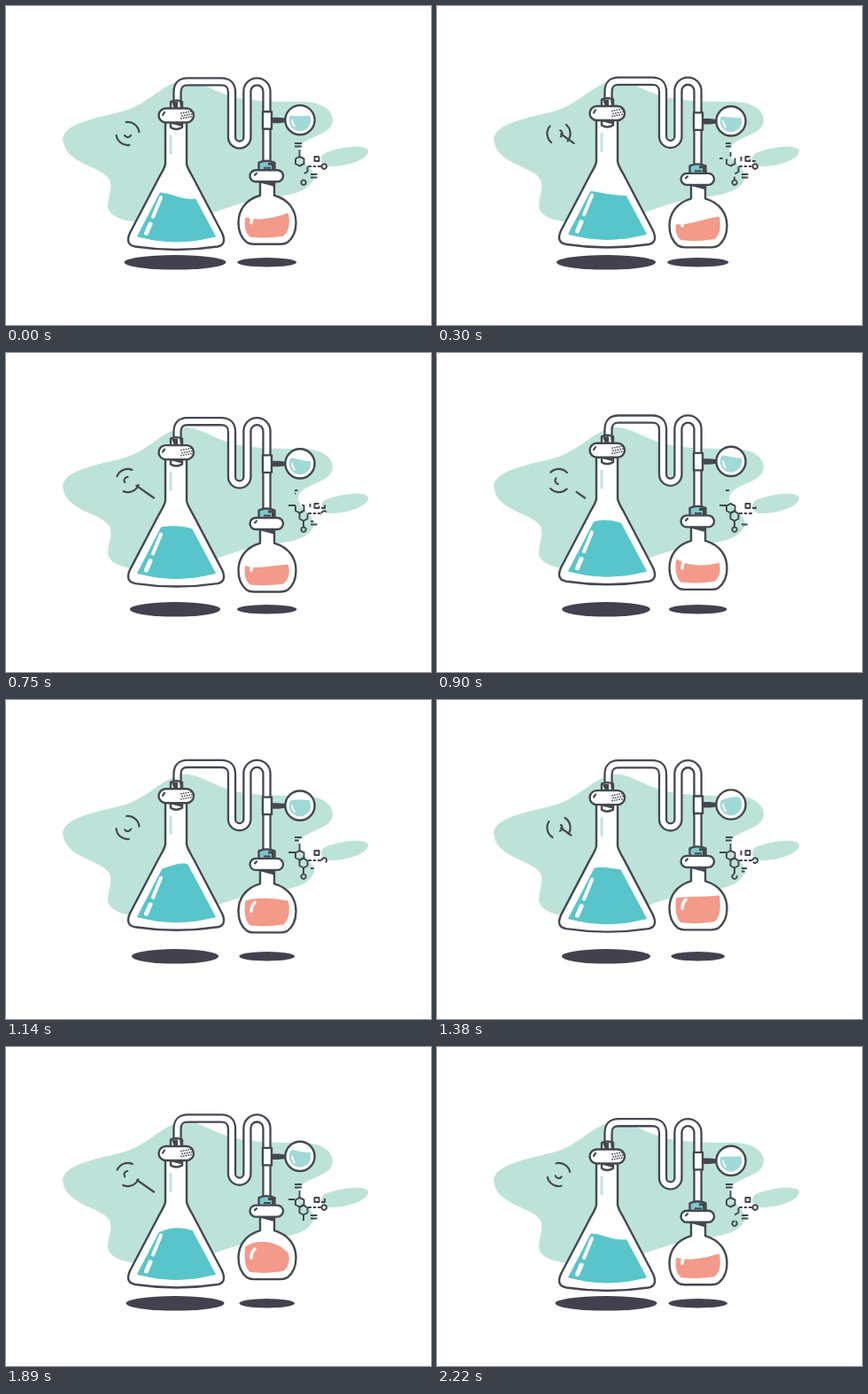
Animation, 480 px wide and 360 px high, one loop 2.25 s. Source, as an HTML page:

```html
<!DOCTYPE html>
<html lang="en">
<head>
<meta charset="utf-8">
<title>Chemistry set</title>
<style>
html, body { margin: 0; height: 100%; overflow: hidden; background: #fff; }
svg { display: block; }
.line { fill: none; stroke: #444850; stroke-width: 2.2; stroke-linecap: round; stroke-linejoin: round; }
.glass { fill: #fff; stroke: #444850; stroke-width: 2.4; stroke-linejoin: round; }
.ink { fill: #444850; }
.shine { fill: none; stroke: #fff; stroke-linecap: round; }
#molecule path { stroke-width: 2; stroke-linecap: butt; }
</style>
</head>
<body>
<svg width="480" height="360" viewBox="0 0 480 360">
  <defs>
    <clipPath id="round"><circle r="12.3"/></clipPath>
    <path id="tube" d="M193.500 110V97Q193.500 85 205 85H243Q255 85 255 97V147.500A8.700 8.700 0 0 0 272.400 147.500V96A11 11 0 0 1 294.500 96V190"/>
  </defs>
  <g fill="#bde3d9">
    <path d="M64 150C66 134 94 128 127 120C160 113 172 90 199 84C216 81 234 98 264 104C286 108 309 108 334 108C356 108 369 117 369 129C368 148 334 146 330 163C329 175 344 179 347 189C349 194 348 196 345 199C338 214 302 215 277 220C242 228 212 245 170 245C137 245 116 239 115 226C115 214 121 206 117 196C108 180 66 179 64 150Z"/>
    <path d="M360 166C379 158 407 156 409 163C410 174 381 182 364 181C356 180 353 171 360 166Z"/>
  </g>
  <g fill="#43414e">
    <ellipse id="shadowA" cx="191" cy="289.300" ry="8.300"/>
    <ellipse id="shadowB" cx="294.700" cy="289.300" ry="5.200"/>
  </g>

  <g id="pipe" fill="none">
    <use href="#tube" stroke="#444850" stroke-width="10.400"/>
    <use href="#tube" stroke="#fff" stroke-width="5.800"/>
  </g>

  <g id="flaskA">
    <path class="glass" d="M180 130V178C179 184 175 189 172 195L140 256C136 265 138 270 146 271.500C176 276 209 276 239 271.500C246 270 248 265 244 256L212 195C209 189 205 184 204 178V130Z"/>
    <path id="liquidA" fill="#58c5ca" stroke="#58c5ca" stroke-linejoin="round"/>
    <path class="shine" stroke-width="4" d="M175 216L166 238"/>
    <path class="shine" stroke-width="5" d="M163 246L158.500 256.500"/>
    <path stroke="#bde3d9" stroke-width="2.800" stroke-linecap="round" d="M186 147V166"/>
    <path class="glass" d="M186 130V137Q192 141 199 137V130Z"/>
    <path class="ink" d="M187 131H199V136L187 133Z"/>
    <path class="glass" d="M186 116V108Q192 105 199 108V116Z"/>
    <path class="ink" d="M187 108H194V116H190ZM196 108H199V116H197Z"/>
    <rect class="glass" x="172.500" y="115.500" width="39.500" height="16" rx="8"/>
    <path class="line" stroke-width="3" d="M177 123L179 120"/>
    <g id="dots" class="ink"></g>
  </g>

  <g id="flaskB">
    <path class="glass" d="M287 196V214C270 219 262.500 231 262.500 245C262.500 256 267 263 272 267Q275 269 280 269H310Q315 269 318 267C323 263 327.500 256 327.500 245C327.500 231 320 219 303 214V196Z"/>
    <path id="liquidB" fill="#f39a8a" stroke="#f39a8a" stroke-width="2" stroke-linejoin="round"/>
    <path class="shine" stroke-width="3.500" d="M281 235Q277 239 277 245"/>
    <path class="ink" d="M288 198H303V204L288 200Z"/>
    <path class="glass" style="fill:#7fc6c8" d="M285.500 187V177Q294 173 303.500 177V187Z"/>
    <path class="ink" d="M296 177H303V187H300V180H296ZM291 182H299V184H291Z"/>
    <rect class="glass" x="275.500" y="185.500" width="37.500" height="13" rx="6.500"/>
    <path class="line" stroke-width="3" d="M281 191L283 189"/>
  </g>

  <g id="bulb">
    <path class="ink" d="M300 126H308L316 127V131.500L308 132.500H300Z"/>
    <rect class="glass" x="290" y="119.500" width="10" height="19.500"/>
    <g transform="translate(332 129)">
      <circle class="glass" r="16.600"/>
      <g clip-path="url(#round)"><path id="liquidC" fill="#a1d9d8"/></g>
      <path class="shine" stroke-width="1.800" d="M-9 0Q-8 5 -6 7"/>
    </g>
  </g>

  <g transform="translate(137.500 144)">
    <path id="orbit" class="line" d="M-1 -13A13 13 0 0 1 13 -1M1 13A13 13 0 0 1 -13 1"/>
    <path id="core" class="line" d="M3.500 2A4 4 0 0 1 -3.500 2"/>
  </g>
  <path id="handle" class="line"/>
  <g id="molecule"></g>
</svg>
<script>
const LOOP = 2250, TIMES = [0, 570, 900, 1140, 1590, 1890], N = TIMES.length;
const $ = id => document.getElementById(id);
const set = (id, name, value) => $(id).setAttribute(name, value);
const clamp = x => Math.max(0, Math.min(1, x));
const ease = x => (x = clamp(x)) * x * (3 - 2 * x);

// Smooth periodic curve through one value per entry of TIMES
function key(values, t) {
  const time = i => TIMES[(i + N) % N] + Math.floor(i / N) * LOOP;
  const value = i => values[(i + N) % N];
  const slope = i => (value(i + 1) - value(i - 1)) / (time(i + 1) - time(i - 1));
  let i = N - 1;
  while (TIMES[i] > t) i--;
  const span = time(i + 1) - time(i), u = (t - time(i)) / span, w = ease(u);
  return value(i) * (1 - w) + value(i + 1) * w +
    span * u * (1 - u) * (slope(i) * (1 - u) - slope(i + 1) * u);
}

// Surface heights: left end, two handles, right end
const SURFACE_A = [[211, 212, 205, 206, 203, 213], [211, 213, 201, 203, 200, 207],
                   [220, 211, 203, 198, 210, 207], [218, 214, 206, 201, 209, 211]];
const SURFACE_B = [[240, 245, 236, 234, 234, 233], [244, 245, 244, 230, 235, 226],
                   [241, 233, 244, 231, 235, 224], [235, 237, 240, 234, 231, 240]];
const SURFACE_C = [[-5, -6, -7, -6, -3, -9], [-4, -7, -7, -7, -8, -7],
                   [-5, -1, -3, -7, -12, -3], [-5, -3, -4, -6, -7, -5]];
const surface = (rows, t) => rows.map(row => key(row, t));

// Each bond: its path and how much of it is drawn at each of TIMES
const BONDS = [
  ["M326 155H334", [1, .5, .5, 1, 1, 1]],
  ["M326 158.500H334", [1, .5, 0, .6, 1, 1]],
  ["M331.500 170V162", [1, .3, 0, 1, 1, 1]],
  ["M319 172H327", [0, 1, 1, 1, 1, .9]],
  ["M327 172.500V178L331.500 180.500L336.500 178V172.500L331.500 170Z", [1, .5, 1, 1, 1, 1]],
  ["M340.500 181.500V187L336 189.500L331.500 187V181L336 178.500Z", [.3, .5, 1, 1, 1, 1]],
  ["M336 196V189", [0, 1, 1, 1, .8, 1]],
  ["M336 196.500A2.700 2.700 0 1 0 336.100 196.500", [1, 1, 1, 1, .6, 0]],
  ["M353.500 170H348.500V175H353.500Z", [1, .75, 1, 1, 1, 1]],
  ["M343.500 170V174.500H347", [0, 1, 0, 0, 1, 0]],
  ["M356 175H360V171", [0, 1, .7, 0, 0, 1]],
  ["M341 181H345", [1, 1, 1, 1, 1, 1]],
  ["M347 181H350", [1, 1, 1, 1, 1, 1]],
  ["M352 181H356", [1, .8, 1, 1, 1, 1]],
  ["M356.500 181A2.800 2.800 0 1 1 356.500 181.100", [1, 1, 0, .65, 1, 1]],
  ["M344 190H351.500", [1, 1, 0, .5, 1, 1]],
  ["M344 193.500H351.500", [1, 1, .9, 0, 1, 1]]
];
$("molecule").innerHTML = BONDS.map(([d]) => `<path class="line" pathLength="1" d="${d}"/>`).join("");
const bondPaths = [...$("molecule").children];

for (let i = 0; i < 15; i++) {
  const row = Math.floor(i / 5), column = i % 5;
  $("dots").innerHTML += `<circle cx="${198 + column * 2.7 + row % 2}" cy="${121 + row * 3 - column * .5}" r=".9"/>`;
}

function draw(t) {
  const wave = lag => Math.cos((t - lag) / LOOP * 2 * Math.PI);
  const shift = (id, y) => set(id, "transform", `translate(0 ${y})`);
  shift("flaskA", 7.6 * (wave(0) - 1));
  shift("pipe", 7 * wave(110) - 6.3);
  shift("bulb", 6 * wave(240) - 5);
  shift("flaskB", 6.9 * wave(400) - 3.3);
  set("shadowA", "rx", 53.2 + 4.2 * wave(0));
  set("shadowB", "rx", 32.5 + 2.3 * wave(400));

  const [l, a, b, r] = surface(SURFACE_A, t);
  set("liquidA", "d", `M${174 - (l - 211) * .52} ${l}C186 ${a} 198 ${b} ${214 + (r - 218) * .53} ${r}` +
    "L236.500 260Q192 272 148.500 260Z");
  const [l2, a2, b2, r2] = surface(SURFACE_B, t);
  set("liquidB", "d", `M271 ${l2}C282 ${a2} 303 ${b2} 318 ${r2}Q321 252 313 259Q295 262 276 260Q269 254 271 ${l2}Z`);
  const [l3, a3, b3, r3] = surface(SURFACE_C, t);
  set("liquidC", "d", `M-13 ${l3}C-4 ${a3} 4 ${b3} 13 ${r3}V13H-13Z`);

  set("orbit", "transform", `rotate(${t / LOOP * 360 - 4})`);
  set("core", "transform", `rotate(${-t / LOOP * 720})`);

  const phase = t % (LOOP / 2), from = ease((phase - 560) / 565), to = ease(phase / 570);
  const point = u => `${140 + 27 * u} ${144.5 + 19 * u}`;
  set("handle", "d", to - from > .01 ? `M${point(from)}L${point(to)}` : "");

  BONDS.forEach(([, shown], i) => {
    const part = clamp(key(shown, t));
    bondPaths[i].setAttribute("stroke-dasharray", `${part} 2`);
    bondPaths[i].setAttribute("visibility", part > .02 ? "visible" : "hidden");
  });
}

function frame() {
  draw(performance.now() % LOOP);
  requestAnimationFrame(frame);
}
frame();
</script>
</body>
</html>
```
